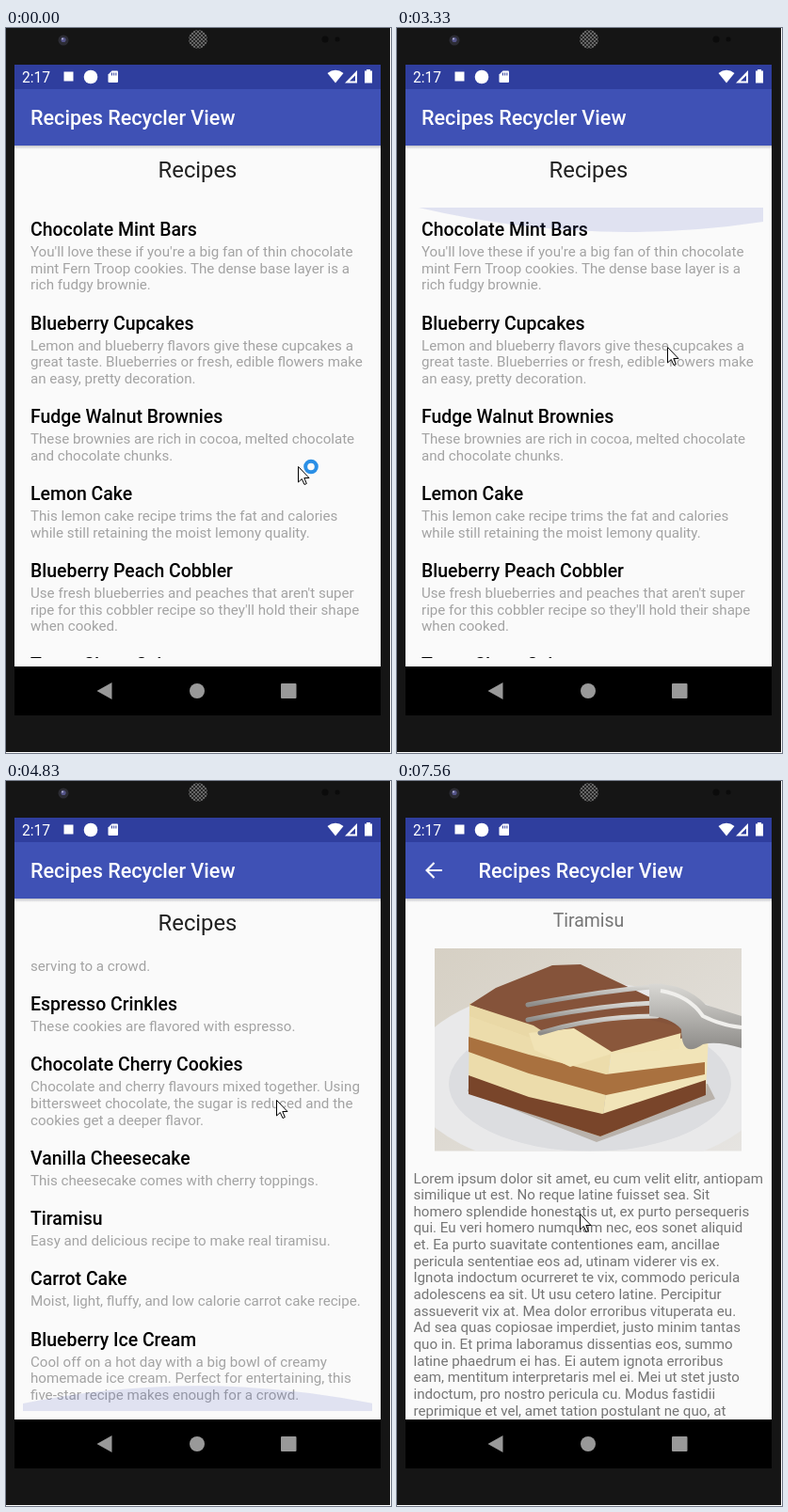
An HTML page for the animation above (8000 ms loop, 409 px wide and 771 px high).

```html
<!DOCTYPE html>
<html lang="en">
<head>
<meta charset="utf-8">
<title>Recipes</title>
<style>
html, body { margin: 0; width: 100%; height: 100%; overflow: hidden; background: #fff; }
svg { display: block; width: 409px; height: 771px; }
text { font-family: Roboto, Arial, sans-serif; font-size: 15.13px; white-space: pre; }
.bar { font-size: 21.6px; font-weight: 500; fill: #fff; }
.name { font-size: 19.46px; font-weight: 500; fill: #000; }
.desc { fill: #a3a3a3; }
.body { fill: #757575; }
</style>
</head>
<body>
<svg viewBox="0 0 409 771">
  <defs>
    <clipPath id="listClip"><path d="M9 191H398V670H9Z"/></clipPath>
    <clipPath id="pageClip"><path d="M9 65H398V679H9Z"/></clipPath>
    <clipPath id="photoClip"><path d="M40 178H366V393.5H40Z"/></clipPath>
    <linearGradient id="shade" x2="0" y2="1"><stop stop-color="#c4c4c8"/><stop offset="1" stop-color="#fafafa"/></linearGradient>
    <linearGradient id="cloth" x2="1" y2="1"><stop stop-color="#d6d0c4"/><stop offset="1" stop-color="#e6e4e1"/></linearGradient>
    <linearGradient id="steel" x2="0" y2="1"><stop stop-color="#d9d8d4"/><stop offset="1" stop-color="#8d8b88"/></linearGradient>
    <pattern id="mesh" width="4" height="4" patternUnits="userSpaceOnUse"><path d="M0 0L4 4M4 0L0 4" stroke="#777" stroke-width=".8"/></pattern>
  </defs>

  <!-- phone -->
  <path d="M0 0H408V770H0Z" fill="#151515"/>
  <circle cx="61" cy="13" r="5.5" fill="#2c2c34"/><circle cx="61" cy="12.5" r="2.6" fill="#55558a"/><circle cx="60" cy="11.5" r="1" fill="#b9b9d8"/>
  <circle cx="204" cy="12" r="10" fill="#262626"/><circle cx="204" cy="12" r="10" fill="url(#mesh)"/>
  <circle cx="339" cy="12" r="3.5" fill="#0b0b0b"/><circle cx="352" cy="12" r="2.5" fill="#0b0b0b"/>
  <path d="M9 39H398V66H9Z" fill="#2f3e9e"/>
  <path d="M9 65H398V679H9Z" fill="#fafafa"/>

  <!-- status bar -->
  <g fill="#fff">
    <text x="17" y="57.5" style="font-size:15.6px">2:17</text>
    <path d="M61.5 46.5h10v10h-10z"/>
    <circle cx="90" cy="52" r="7.3"/>
    <path d="M112.5 45.5H118q1 0 1 1V57q0 1-1 1H109.5q-1 0-1-1V49.5Z"/>
    <path d="M112.5 47.5v3M114.7 47.5v3M116.9 47.5v3" stroke="#2f3e9e"/>
    <path d="M341.5 48Q350 41.5 358.5 48L350 58.5Z"/>
    <path d="M373 45V58.5H360Z"/>
    <path d="M371 50.5V56.5H365Z" fill="#2f3e9e"/>
    <path d="M383 44h4v1.5h2V58.5h-8V45.5h2z"/>
  </g>

  <!-- list screen -->
  <path d="M9 125H398V129H9Z" fill="url(#shade)"/>
  <path d="M9 65H398V125H9Z" fill="#3f51b5"/>
  <text class="bar" x="26" y="103">Recipes Recycler View</text>
  <text x="203.5" y="159" text-anchor="middle" style="font-size:23.8px" fill="#212121">Recipes</text>
  <g clip-path="url(#listClip)">
    <g id="list"></g>
    <path id="glow" fill="#3f51b5"/>
  </g>

  <!-- detail screen -->
  <g clip-path="url(#pageClip)"><g id="detail">
    <path d="M9 65H398V731H9Z" fill="#fafafa"/>
    <path d="M9 125H398V129H9Z" fill="url(#shade)"/>
    <path d="M9 65H398V125H9Z" fill="#3f51b5"/>
    <path d="M48 95H32M39.5 87L31.5 95L39.5 103" fill="none" stroke="#fff" stroke-width="2.1"/>
    <text class="bar" x="86.5" y="103">Recipes Recycler View</text>
    <text class="body" x="203.5" y="155" text-anchor="middle" style="font-size:19.46px">Tiramisu</text>
    <g clip-path="url(#photoClip)">
      <path d="M40 178H366V394H40Z" fill="url(#cloth)"/>
      <ellipse cx="205" cy="315" rx="195" ry="100" fill="#e9e9ea"/>
      <ellipse cx="205" cy="322" rx="150" ry="72" fill="#dcdde0"/>
      <path d="M75 330L212 384L338 338L330 322L80 312Z" fill="#b9b2ab"/>
      <path d="M77 236L228 286L216 378L76 332Z" fill="#ecdcab"/>
      <path d="M228 286L331 268L328 333L216 378Z" fill="#f1e4b8"/>
      <path d="M76 272L140 291L222 312L327 299V312L222 334L140 311L76 288Z" fill="#a9713f"/>
      <path d="M76 313L140 336L218 354L328 318V334L216 378L76 333Z" fill="#79452a"/>
      <path d="M77 238L105 220L165 196L195 195L300 245L331 268L228 288L170 278L145 262Z" fill="#85533a"/>
      <path d="M77 238L145 260L172 277L150 276L77 250Z" fill="#e9d8a6"/>
      <path d="M140 268L235 258L302 262L300 285L228 290L184 304L146 286Z" fill="#f1e3b5"/>
      <path d="M180 258L240 247L303 262L302 268L228 288Z" fill="#8a573b"/>
      <g fill="none" stroke="url(#steel)" stroke-width="5" stroke-linecap="round">
        <path d="M139 238Q220 223 280 218"/><path d="M139 254Q220 238 276 236"/><path d="M152 268Q210 250 276 250"/>
      </g>
      <path d="M268 216Q305 214 328 238L366 250V284Q340 276 325 280Q302 296 302 264Q292 252 268 250Z" fill="url(#steel)"/>
      <path d="M280 223Q310 228 325 250Q345 260 366 262" fill="none" stroke="#f0efec" stroke-width="4"/>
    </g>
    <g id="story"></g>
  </g></g>

  <!-- navigation bar -->
  <path d="M9 679H398V731H9Z" fill="#000"/>
  <g fill="#999"><path d="M96.5 705L112.5 696V714Z"/><circle cx="203" cy="705" r="8"/><rect x="292" y="697" width="16.5" height="16" rx="1"/></g>

  <g id="cursor">
    <path d="M.5.5V17L4.3 13.5L7 19.5L9.3 18.5L6.8 12.5H12Z" fill="#fff" stroke="#000"/>
    <circle id="busy" cx="14" cy=".5" r="5.8" fill="none" stroke="#2a8fe6" stroke-width="4"/>
  </g>
</svg>
<script>
const recipes = `Chocolate Mint Bars|You'll love these if you're a big fan of thin chocolate|mint Fern Troop cookies. The dense base layer is a|rich fudgy brownie.
Blueberry Cupcakes|Lemon and blueberry flavors give these cupcakes a|great taste. Blueberries or fresh, edible flowers make|an easy, pretty decoration.
Fudge Walnut Brownies|These brownies are rich in cocoa, melted chocolate|and chocolate chunks.
Lemon Cake|This lemon cake recipe trims the fat and calories|while still retaining the moist lemony quality.
Blueberry Peach Cobbler|Use fresh blueberries and peaches that aren't super|ripe for this cobbler recipe so they'll hold their shape|when cooked.
Texas Sheet Cake|This class Texas sheet cake recipe features a|homemade chocolate cake layer topped with|chocolate frosting and chopped toasted pecans.|Its rectangular shape makes this cake perfect for|serving to a crowd.
Espresso Crinkles|These cookies are flavored with espresso.
Chocolate Cherry Cookies|Chocolate and cherry flavours mixed together. Using|bittersweet chocolate, the sugar is reduced and the|cookies get a deeper flavor.
Vanilla Cheesecake|This cheesecake comes with cherry toppings.
Tiramisu|Easy and delicious recipe to make real tiramisu.
Carrot Cake|Moist, light, fluffy, and low calorie carrot cake recipe.
Blueberry Ice Cream|Cool off on a hot day with a big bowl of creamy|homemade ice cream. Perfect for entertaining, this|five-star recipe makes enough for a crowd.`;
const lorem = `Lorem ipsum dolor sit amet, eu cum velit elitr, antiopam
similique ut est. No reque latine fuisset sea. Sit
homero splendide honestatis ut, ex purto persequeris
qui. Eu veri homero numquam nec, eos sonet aliquid
et. Ea purto suavitate contentiones eam, ancillae
pericula sententiae eos ad, utinam viderer vis ex.
Ignota indoctum ocurreret te vix, commodo pericula
adolescens ea sit. Ut usu cetero latine. Percipitur
assueverit vix at. Mea dolor erroribus vituperata eu.
Ad sea quas copiosae imperdiet, justo minim tantas
quo in. Et prima laboramus dissentias eos, summo
latine phaedrum ei has. Ei autem ignota erroribus
eam, mentitum interpretaris mel ei. Mei ut stet justo
indoctum, pro nostro pericula cu. Modus fastidii
reprimique et vel, amet tation postulant ne quo, at`;

const el = id => document.getElementById(id);
function addText(parent, cls, x, y, str) {
  const node = document.createElementNS('http://www.w3.org/2000/svg', 'text');
  node.setAttribute('class', cls);
  node.setAttribute('x', x);
  node.setAttribute('y', y);
  node.textContent = str;
  parent.append(node);
}

const LINE = 17.7;
let baseline = 221;
for (const recipe of recipes.split('\n')) {
  const [title, ...lines] = recipe.split('|');
  addText(el('list'), 'name', 26, baseline, title);
  lines.forEach((s, i) => addText(el('list'), 'desc', 26, baseline + 22 + i * LINE, s));
  baseline += 46.5 + lines.length * LINE;
}
lorem.split('\n').forEach((s, i) => addText(el('story'), 'body', 17.5, 427.5 + i * 17.66, s));

// The screen refreshes only at these moments: [first, last, count]
const ticks = [0];
for (const [a, b, n] of [[150, 1110, 8], [1260, 1680, 4], [2080, 2080, 1], [2360, 2930, 5],
  [3210, 4170, 8], [4320, 5100, 7], [5370, 6180, 7], [7020, 7560, 5]])
  for (let i = 0; i < n; i++) ticks.push(a + (b - a) * i / Math.max(1, n - 1));

// Keyframes: [time, ...values], linear in between
const cursorKeys = [[0, 310, 466], [560, 47, 350], [1110, 308, 478], [1400, 245, 335], [1540, 262, 322],
  [1680, 287, 339], [5370, 287, 339], [5505, 212, 386], [6180, 90, 470], [7155, 90, 470], [7560, 194, 460]];
const scrollKeys = [[0, 0], [1680, 0], [2080, 151], [2360, 75.7], [2502, 0], [3350, 0], [4170, 403], [4580, 574.5]];
const topGlow = [[2502, 0], [2930, 20], [3210, 24], [3347, 26], [3500, 0]];
const bottomGlow = [[4580, 0], [4970, 40], [5370, 50], [5505, 53], [6045, 0]];
const detailKeys = [[7155, 0], [7425, 1]];

function at(keys, t) {
  const i = keys.findIndex(k => k[0] > t);
  if (i === 0) return keys[0].slice(1);
  if (i < 0) return keys[keys.length - 1].slice(1);
  const a = keys[i - 1], b = keys[i], p = (t - a[0]) / (b[0] - a[0]);
  return a.slice(1).map((v, j) => v + (b[j + 1] - v) * p);
}

// Parabolic bulge on one list edge, cut to the list width
function bulge(edge, dir, depth, cx) {
  const half = 222, l = Math.max(18, cx - half), r = Math.min(389, cx + half);
  const y = x => edge + dir * depth * (1 - ((x - cx) / half) ** 2);
  const slope = -2 * dir * depth * (l - cx) / half ** 2;
  return `M${l} ${edge}V${y(l)}Q${(l + r) / 2} ${y(l) + slope * (r - l) / 2} ${r} ${y(r)}V${edge}Z`;
}

function draw(now) {
  const clock = now % 8000;
  const t = ticks.filter(k => k <= clock + 20).pop();
  const [x, y] = at(cursorKeys, t).map(Math.round);
  el('cursor').setAttribute('transform', `translate(${x} ${y})`);
  el('busy').setAttribute('visibility', t < 1260 ? 'visible' : 'hidden');
  el('list').setAttribute('transform', `translate(0 ${-at(scrollKeys, t)[0]})`);

  const [up] = at(topGlow, t), [down] = at(bottomGlow, t);
  el('glow').setAttribute('d', up ? bulge(191, 1, up, 245) : bulge(670, -1, down, 204));
  el('glow').setAttribute('opacity', 0.14 * Math.min(1, (up + down) / 20));

  const [shown] = at(detailKeys, t);
  el('detail').setAttribute('opacity', shown);
  el('detail').setAttribute('transform', `translate(0 ${55 * (1 - shown) ** 2})`);
  requestAnimationFrame(draw);
}
requestAnimationFrame(draw);
</script>
</body>
</html>
```
